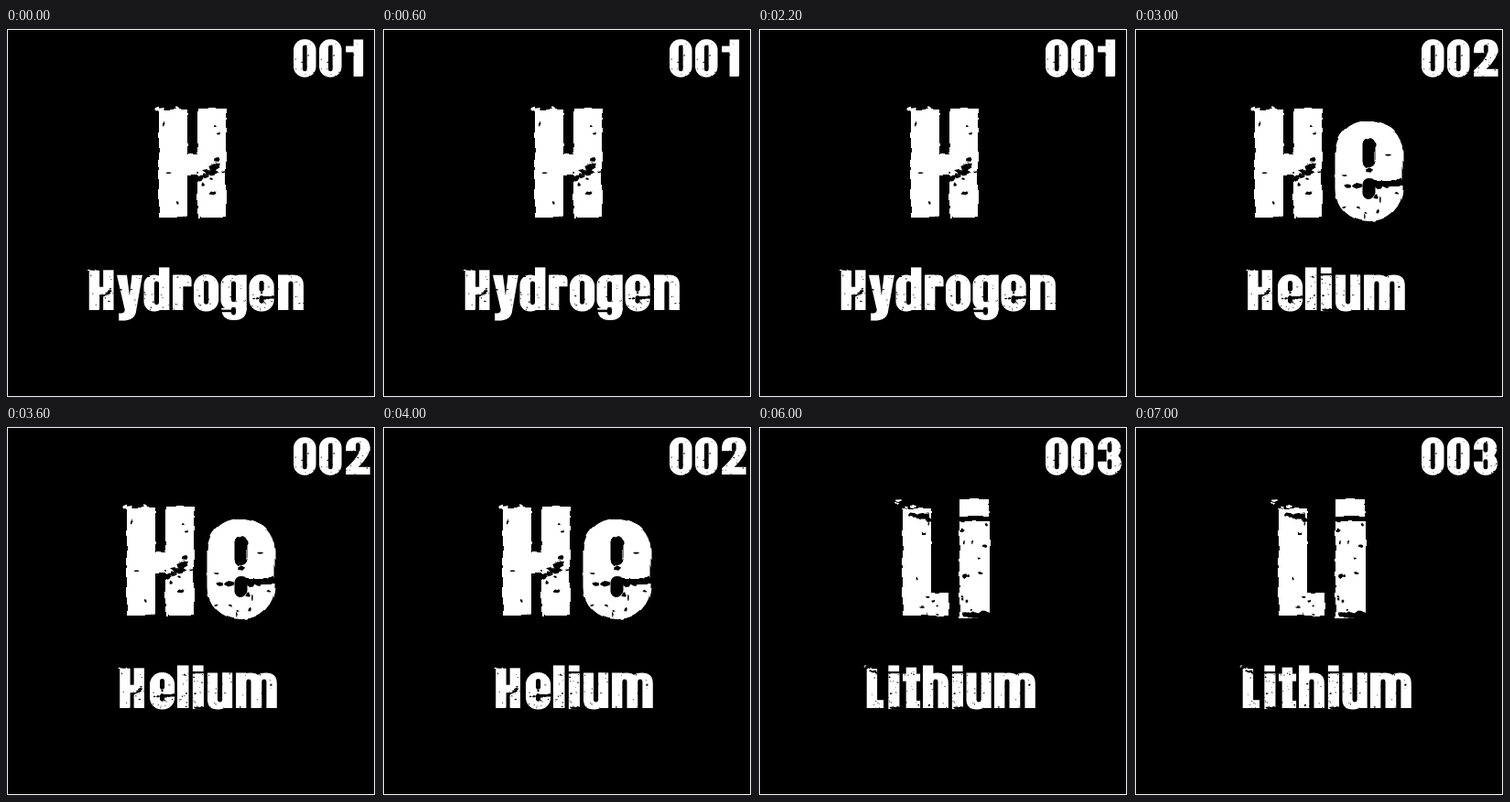
An HTML page for the animation above (8000 ms loop, 404x404 px).

```html
<!DOCTYPE html>
<html lang="en">
<head>
<meta charset="utf-8">
<title>Elements</title>
<style>
html, body { margin: 0; width: 100%; height: 100%; overflow: hidden; background: #000; }
#stage { position: relative; width: 404px; height: 404px; background: #000; }
#stage::after { content: ""; position: absolute; inset: 1px; border: 1px solid #fff; }
svg { position: absolute; left: 0; top: 0; visibility: hidden; animation: 8s step-end infinite; }
#s0 { animation-name: first; }
#s1 { animation-name: second; }
#s2 { animation-name: third; }
@keyframes first { 0% { visibility: visible } 37.5%, 100% { visibility: hidden } }
@keyframes second { 0% { visibility: hidden } 37.5% { visibility: visible } 75%, 100% { visibility: hidden } }
@keyframes third { 0% { visibility: hidden } 75%, 100% { visibility: visible } }
</style>
</head>
<body>
<div id="stage"></div>
<script>
// Letter parts: baseline at y = 0, capitals CAP high, stems STEM wide.
const CAP = 119, MID = 105, ASC = 127, STEM = 31, SLOT = 14;

const path = (d, fill = '') => `<path d="${d}" ${fill}/>`;
const box = (x0, y0, x1, y1, r = 0) =>
  `<rect x="${x0}" y="${y0}" width="${x1 - x0}" height="${y1 - y0}" rx="${r}"/>`;
const pill = (x0, y0, x1, y1) => box(x0, y0, x1, y1, (x1 - x0) * .48);
const stem = (x, height, base = 0) => box(x, -height, x + STEM, base);
// One flat end, one rounded end; works both ways up.
function dome(x0, x1, flat, round) {
  const r = (x1 - x0) * .48, y = round + Math.sign(flat - round) * r;
  return path(`M${x0} ${flat}V${y}Q${x0} ${round} ${x0 + r} ${round}H${x1 - r}Q${x1} ${round} ${x1} ${y}V${flat}Z`);
}
const slot = (top, base, x = STEM) => pill(x, top, x + SLOT, base);
const arch = x => dome(x + 10, x + 2 * STEM + SLOT, 0, -MID);

// Each letter: width, white parts, parts cut away.
const letters = {
  H: [75, stem(2, CAP - 1) + stem(44, CAP) + box(30, -69, 46, -46)],
  e: [75, pill(0, -MID - 1, 74, 4), slot(-87, -55, 30) + slot(-43, -20, 30) + box(42, -41, 78, -34)],
  L: [52, stem(2, CAP - 2) + box(30, -24, 52, 0)],
  i: [35, box(1, -ASC, 33, -109) + box(1, -103, 34, 3)],
  l: [34, box(0, -ASC, 34, 0)],
  n: [76, stem(0, MID) + arch(0), slot(-86, 8)],
  h: [76, stem(0, ASC) + arch(0), slot(-86, 8)],
  m: [122, stem(0, MID) + arch(0) + arch(46), slot(-86, 8) + slot(-86, 8, 77)],
  u: [74, dome(0, 62, -MID, 4) + stem(43, MID), slot(-114, -18, 30)],
  r: [56, stem(0, MID) + dome(20, 56, -70, -MID)],
  o: [74, pill(0, -MID - 1, 74, 4), slot(-87, -17, 30)],
  d: [76, pill(0, -MID, 62, 4) + stem(45, ASC), slot(-86, -16)],
  g: [77, pill(0, -MID, 62, 0) + stem(46, MID) + dome(2, 77, -6, 30), slot(-86, -24) + slot(-9, 15) + box(0, -1, 33, 6)],
  y: [76, path('M0-104H30L38-42 45-104H76L57 6Q52 34 6 31V9Q22 12 24 0Z')],
  t: [52, stem(10, CAP + 2) + box(0, -102, 52, -80) + box(20, -22, 52, 0)],
  0: [72, pill(0, -120, 72, 2), slot(-101, -17, 29)],
  1: [56, stem(25, CAP) + box(0, -98, 30, -78)],
  2: [78, dome(0, 78, -76, -120) + path('M46-90H78Q78-60 40-24H78V0H0V-20Q46-60 46-90Z'), slot(-102, -74, 32)],
  3: [76, pill(0, -120, 74, -48) + pill(0, -72, 76, 2), slot(-103, -71) + slot(-49, -17) + box(-2, -80, 28, -42)]
};
// Large worn patches run from one point to another.
const cracks = { H: [44, -41, 64, -53], e: [14, -34, 70, -40], L: [12, -108, 30, -108], i: [8, 0, 30, 2] };

function random(seed) {
  return () => (seed = (seed * 16807) % 2147483647) / 2147483647;
}

// Ragged scrap centred on x, y.
function scrap(rnd, x, y, w, h) {
  const points = Array.from({ length: 7 }, (_, k) => {
    const a = k / 7 * Math.PI * 2, r = .3 + rnd() * .4;
    return (x + Math.cos(a) * w * r).toFixed(1) + ' ' + (y + Math.sin(a) * h * r).toFixed(1);
  });
  return 'M' + points.join('L') + 'Z';
}
const scraps = (n, make) => Array.from({ length: n }, (_, k) => make(k)).join('');

// Small chips, thickest near the baseline, plus the crack if there is one.
function chips(ch, w, rnd) {
  const grit = scraps(15, () =>
    scrap(rnd, rnd() * w, -110 * rnd() ** 1.7, 2 + 5 * rnd() ** 2, 2 + 4 * rnd() ** 2));
  const [x0, y0, x1, y1] = cracks[ch] || [];
  return grit + (ch in cracks ? scraps(6, k => {
    const t = k / 5;
    return scrap(rnd, x0 + (x1 - x0) * t, y0 + (y1 - y0) * t + rnd() * 6 - 3, 7 + rnd() * 6, 4 + rnd() * 5);
  }) : '');
}

// Loose specks above the top left corner.
const dust = (w, rnd) =>
  scraps(4, () => scrap(rnd, rnd() * 28 - 5, -118 - rnd() * 9, 3 + rnd() * 4, 2 + rnd() * 2));

function glyph(ch, x, y, scale) {
  const [w, ink, cut = ''] = letters[ch], rnd = random(ch.charCodeAt(0) * 977);
  const dark = path(chips(ch, w, rnd)), light = /[HL]/.test(ch) ? path(dust(w, rnd)) : '';
  return `<g transform="translate(${x} ${y}) scale(${scale})"><g filter="url(#rough)">` +
    `${ink}<g fill="#000">${cut}${dark}</g>${light}</g></g>`;
}

const line = (text, xs, y, scale) => [...text].map((ch, k) => glyph(ch, xs[k], y, scale)).join('');

const scenes = [
  ['001', 'H', [165], 'Hydrogen', [90, 121, 150.5, 182, 205, 234.5, 265.5, 297]],
  ['002', 'He', [130, 219.5], 'Helium', [123.5, 157, 187, 203.5, 220, 251]],
  ['003', 'Li', [156, 219], 'Lithium', [118, 142, 158, 180, 211.5, 227.5, 258]]
];

const rough = `<filter id="rough" filterUnits="userSpaceOnUse" x="-15" y="-140" width="160" height="185" color-interpolation-filters="sRGB">
  <feTurbulence type="fractalNoise" baseFrequency=".06" numOctaves="2" seed="4"/>
  <feDisplacementMap in="SourceGraphic" scale="4" xChannelSelector="R" yChannelSelector="G"/></filter>`;

document.getElementById('stage').innerHTML = scenes.map(([num, sign, signX, name, nameX], k) =>
  `<svg id="s${k}" width="404" height="404" fill="#fff" role="img" aria-label="${num} ${sign} ${name}">` +
  (k ? '' : rough) +
  line(num, [314, 342, 371], 53, .34) + line(sign, signX, 207, 1) + line(name, nameX, 308, .367) + '</svg>'
).join('');
</script>
</body>
</html>
```
